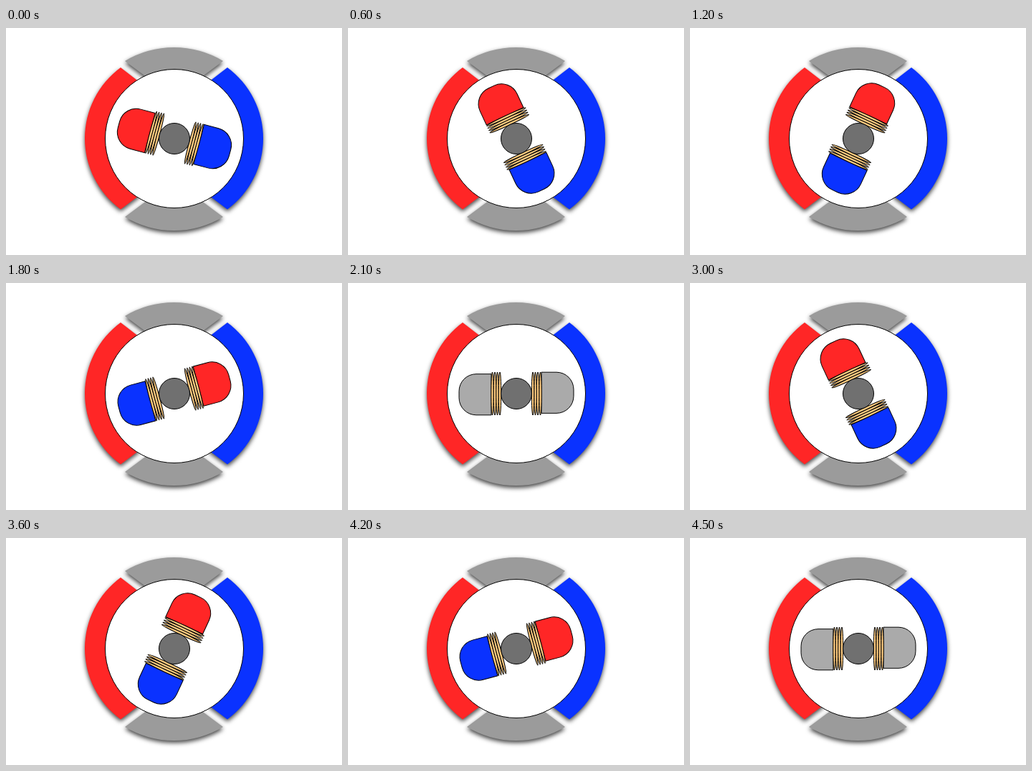
Recreate the animation shown at these times as an HTML page. Size 469 px wide and 316 px high, loop 4800 ms.

```html
<!DOCTYPE html>
<html lang="en">
<head>
<meta charset="utf-8">
<title>Electric motor</title>
<style>
  html, body { margin: 0; width: 100%; height: 100%; overflow: hidden; background: #fff; }
  svg { display: block; }
  .stator path { filter: drop-shadow(0 3px 3px rgba(0, 0, 0, .75)); }
  .line { stroke: #000; stroke-width: 1; }
</style>
</head>
<body>
<svg width="469" height="316" viewBox="0 0 469 316">
  <defs>
    <path id="core" d="M-35-27.300H-56A24 24 0 0 0-80-3.300V5.800A24 24 0 0 0-56 29.800H-35Z"/>
    <ellipse id="turn" rx="1.750" ry="30"/>
    <g id="coil" fill="#ffcc80">
      <use href="#turn" x="-33.500"/>
      <use href="#turn" x="-30"/>
      <use href="#turn" x="-26.500"/>
      <use href="#turn" x="-23"/>
    </g>
  </defs>
  <g class="stator">
    <path fill="#9b9b9b" d="M166 46A133 133 0 0 1 303 46L272 69H197Z"/>
    <path fill="#9b9b9b" d="M166 263A133 133 0 0 0 303 263L272 240H197Z"/>
    <path fill="#ff2626" d="M160 55A122.500 122.500 0 0 0 160 252.500L186 233V75Z"/>
    <path fill="#0a32ff" d="M309 55A122.500 122.500 0 0 1 309 252.500L283 233V75Z"/>
  </g>
  <circle class="line" cx="235" cy="154" r="96.500" fill="#fff"/>
  <g transform="translate(235 154)">
    <g id="rotor" class="line">
      <use id="poleA" href="#core"/>
      <use href="#coil"/>
      <g transform="rotate(180)">
        <use id="poleB" href="#core"/>
        <use href="#coil"/>
      </g>
    </g>
    <circle class="line" r="21.500" fill="#707070"/>
  </g>
</svg>
<script>
  const STEP_MS = 300;
  const angles = [15, 40, 65, 90, 115, 140, 165, 180];
  const [rotor, poleA, poleB] = ['rotor', 'poleA', 'poleB'].map(id => document.getElementById(id));

  function draw(now) {
    const angle = angles[Math.floor(now / STEP_MS) % angles.length];
    const powered = angle < 180; // the current is off while the poles switch
    rotor.setAttribute('transform', `rotate(${angle})`);
    poleA.setAttribute('fill', powered ? '#ff2626' : '#aaa');
    poleB.setAttribute('fill', powered ? '#0a32ff' : '#aaa');
  }

  let start;
  function tick(now) {
    start ??= now;
    draw(now - start);
    requestAnimationFrame(tick);
  }
  draw(0);
  requestAnimationFrame(tick);
</script>
</body>
</html>
```
